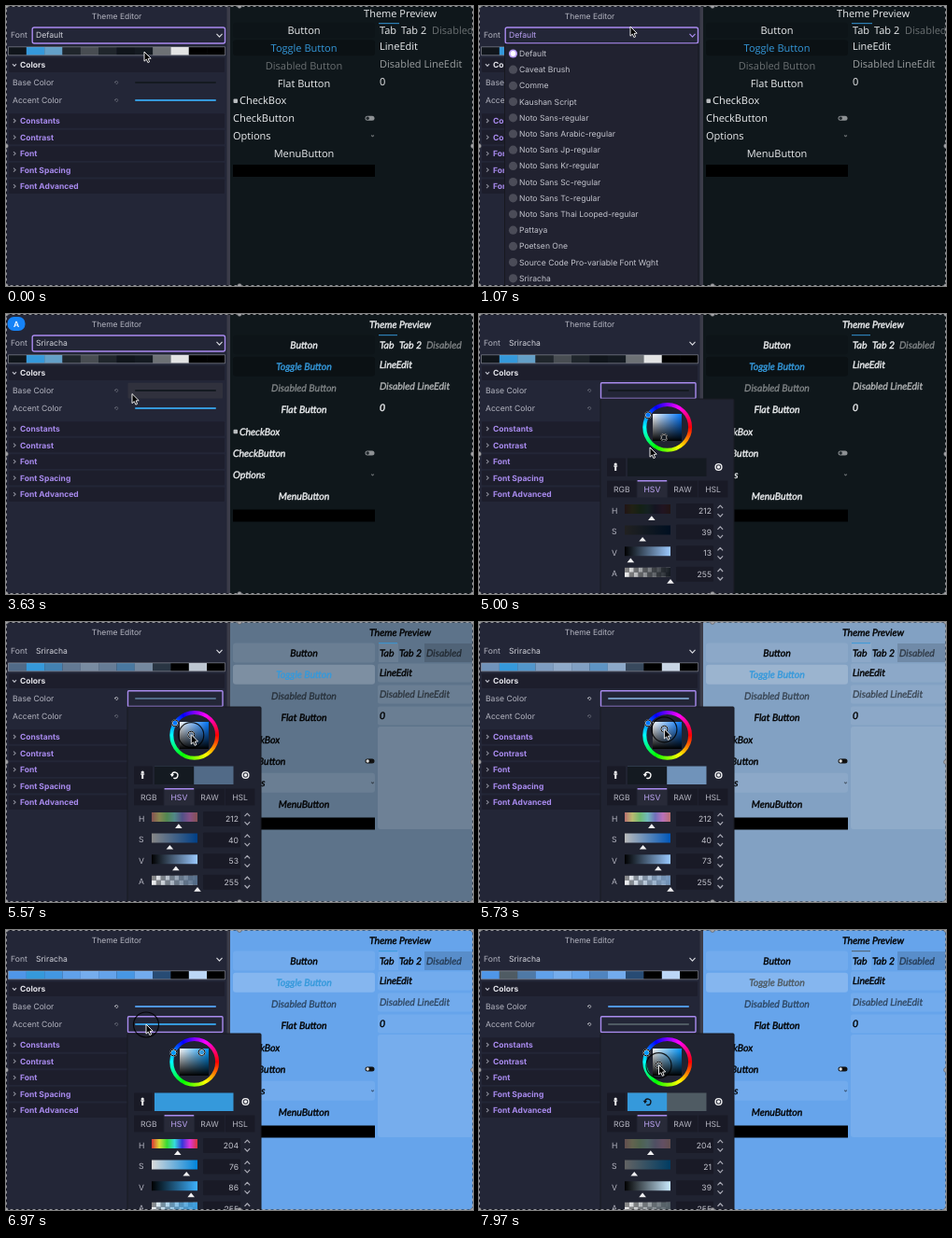
An HTML page with a canvas that plays this animation: 500 by 300 pixels, repeating every 8 s.

```html
<!DOCTYPE html>
<html lang="en">
<head>
<meta charset="utf-8">
<title>Theme Editor</title>
<style>
  html, body { margin: 0; width: 100%; height: 100%; overflow: hidden; background: #232637; }
  canvas { display: block; width: 500px; height: 300px; }
</style>
</head>
<body>
<canvas id="stage"></canvas>
<script>
const LOOP = 8000;
const PURPLE = '#a98bef', PANEL = '#232637', HEADER = '#1d1e2c', DARK = '#191a26', LABEL = '#b4b5c0';
const BLACK = [0, 0, 0], WHITE = [255, 255, 255], DEEP = [8, 20, 20];
const UI = 'Inter, sans-serif';
const FONTS = ['Default', 'Caveat Brush', 'Comme', 'Kaushan Script', 'Noto Sans-regular',
  'Noto Sans Arabic-regular', 'Noto Sans Jp-regular', 'Noto Sans Kr-regular', 'Noto Sans Sc-regular',
  'Noto Sans Tc-regular', 'Noto Sans Thai Looped-regular', 'Pattaya', 'Poetsen One',
  'Source Code Pro-variable Font Wght', 'Sriracha'];

// Pointer path: time, x, y
const POINTER = [[30, 148, 49], [290, 162, 22], [1230, 162, 22], [1900, 83, 286], [2030, 81, 288.5],
  [2930, 81, 288.5], [3630, 135, 85.5], [4070, 134, 86], [4500, 134, 86], [5000, 183, 143],
  [5130, 184, 142], [5340, 198, 131], [5730, 198.4, 114.8], [5930, 206.5, 109.6], [5980, 206.5, 109.6],
  [6330, 92, 111], [6450, 92, 111], [6740, 150, 101], [7000, 150, 101], [7560, 207, 132],
  [7630, 207, 132], [7950, 192.5, 144.7]];
const PRESSES = [[480, 830], [2080, 2530], [4300, 4480], [5360, 5950], [6390, 6500], [6810, 6980], [7630, 8000]];
const BASE = { h: 212, initial: [.39, .13], drag: [5360, 5950], top: 0 };
const ACCENT = { h: 204, initial: [.76, .86], drag: [7630, 8000], top: 20 };

const canvas = document.getElementById('stage');
const ratio = window.devicePixelRatio || 1;
canvas.width = 500 * ratio;
canvas.height = 300 * ratio;
const ctx = canvas.getContext('2d');
ctx.scale(ratio, ratio);
ctx.textRendering = 'geometricPrecision';
ctx.lineJoin = 'round';

const clamp = (v, a = 0, b = 1) => Math.min(b, Math.max(a, v));
const between = (t, [a, b]) => t >= a && t < b;
const rgb = (c, alpha = 1) => `rgba(${c.map(Math.round)},${alpha})`;
const mix = (a, b, k) => a.map((v, i) => v + (b[i] - v) * k);
const shade = (c, k) => mix(c, k < 0 ? BLACK : WHITE, Math.abs(k));
const hsv = (h, s, v) => [5, 3, 1].map(n => {
  const k = (n + h / 60) % 6;
  return 255 * v * (1 - s * clamp(Math.min(k, 4 - k)));
});

function pointerAt(t) {
  const next = POINTER.findIndex(p => p[0] > t);
  if (next === 0) return POINTER[0].slice(1);
  if (next < 0) return POINTER.at(-1).slice(1);
  const [t0, x0, y0] = POINTER[next - 1], [t1, x1, y1] = POINTER[next];
  const k = (t - t0) / (t1 - t0), e = k * k * (3 - 2 * k);
  return [x0 + (x1 - x0) * e, y0 + (y1 - y0) * e];
}

// The dragged pointer position inside the picker square gives saturation and value.
function colorAt(slot, t) {
  let [s, v] = slot.initial;
  const changed = t >= slot.drag[0];
  if (changed) {
    const [x, y] = pointerAt(Math.min(t, slot.drag[1]));
    s = clamp((x - 186) / 31);
    v = clamp((136 + slot.top - y) / 29);
  }
  return { h: slot.h, s, v, changed, rgb: hsv(slot.h, s, v), old: hsv(slot.h, ...slot.initial) };
}

function text(str, x, y, color, { size = 8.6, weight = '400', family = UI, align = 'left', bold = 0 } = {}) {
  ctx.font = `${weight} ${size}px ${family}`;
  ctx.textAlign = align;
  ctx.fillStyle = ctx.strokeStyle = color;
  ctx.fillText(str, x, y + size * .36);
  if (bold) {
    ctx.lineWidth = bold;
    ctx.strokeText(str, x, y + size * .36);
  }
}

function box(x, y, w, h, fill, radius = 0, stroke, width = 1.4) {
  ctx.beginPath();
  ctx.roundRect(x, y, w, h, radius);
  if (fill) { ctx.fillStyle = fill; ctx.fill(); }
  if (stroke) { ctx.strokeStyle = stroke; ctx.lineWidth = width; ctx.stroke(); }
}

function circle(x, y, r, fill, stroke, width = 1) {
  box(x - r, y - r, 2 * r, 2 * r, fill, r, stroke, width);
}

function shape(points, fill, stroke, width = 1) {
  ctx.beginPath();
  points.forEach(p => ctx.lineTo(...p));
  if (fill) { ctx.closePath(); ctx.fillStyle = fill; ctx.fill(); }
  if (stroke) { ctx.strokeStyle = stroke; ctx.lineWidth = width; ctx.stroke(); }
}

const chevronV = (x, y, w, h, color) => shape([[x - w, y - h], [x, y + h], [x + w, y - h]], null, color, 1.2);

function gradientBox(x, y, w, h, colors, vertical) {
  const g = ctx.createLinearGradient(x, y, vertical ? x : x + w, vertical ? y + h : y);
  colors.forEach((c, i) => g.addColorStop(i / (colors.length - 1), c));
  box(x, y, w, h, g);
}

function undoIcon(x, y, r, color) {
  ctx.beginPath();
  ctx.arc(x, y, r, -2.9, 2);
  ctx.strokeStyle = color;
  ctx.lineWidth = r * .42;
  ctx.stroke();
  shape([[x - r * 1.6, y - r * .5], [x - r * .9, y + r * .5], [x - r * .2, y - r * .3]], color);
}

function drawPreview(t, base, accent) {
  const script = t >= 2530, light = base.v > .5;
  const step = script ? 23.2 : 18.85, top = script ? 33 : 26, half = step * .45;
  const lift = clamp((base.v - .13) * 2);
  const bg = mix(mix(base.rgb, DEEP, .45 * (1 - lift)), WHITE, .13 * lift);
  const fg = light ? '#000' : '#eceef0';
  const dim = rgb(light ? BLACK : WHITE, light ? .48 : .38);
  const field = light ? 'rgba(255,255,255,.08)' : 'rgba(0,0,0,.12)';
  const style = script
    ? { size: 10.5, weight: 'italic 400', family: 'Lato, sans-serif', bold: .4 }
    : { size: 11, family: '"Open Sans", sans-serif' };
  const write = (s, x, y, color = fg, align = 'left') => text(s, x, y, color, { ...style, align });
  const row = i => top + step * i;
  const rowBox = (i, fill) => box(243, row(i) - half, 152, half * 2, fill, 3);

  box(240, 0, 260, 300, rgb(bg));
  rowBox(0, field);
  rowBox(1, light ? 'rgba(255,255,255,.2)' : 'rgba(0,0,0,.28)');
  if (light) rowBox(6, field);
  write('Button', 319, row(0), fg, 'center');
  write('Toggle Button', 319, row(1), rgb(accent.rgb), 'center');
  write('Disabled Button', 319, row(2), dim, 'center');
  write('Flat Button', 319, row(3), fg, 'center');
  box(243.5, row(4) - 2, 4.5, 4.5, light ? '#222' : '#b9bcbf', 1);
  write('CheckBox', 250, row(4));
  write('CheckButton', 243, row(5));
  box(384.5, row(5) - 2.5, 10, 5, light ? '#111' : '#8d9194', 2.5);
  circle(387.2, row(5), 1.7, light ? '#ddd' : '#20272c');
  write('Options', 243, row(6));
  chevronV(392.5, row(6), 1.4, .6, dim);
  write('MenuButton', 319, row(7), fg, 'center');
  box(243, row(7) + (script ? 14 : 12), 152, 13, '#000');

  write('Theme Preview', 422, script ? 11 : 8.5, fg, 'center');
  const fields = script ? [54, 77, 100] : [43, 62, 81];
  if (light) {
    box(399, 23, 21, 20, field);
    box(448, 23, 52, 20, 'rgba(0,0,0,.14)');
    fields.forEach(y => box(398, y - 9.5, 102, 20, field, 2));
    box(398, 112, 102, 110, 'rgba(255,255,255,.1)', 3);
  }
  box(399, script ? 22 : 18, script ? 20 : 22, 1.2, rgb(accent.rgb, .8));
  write('Tab', 400, top);
  write('Tab 2', script ? 421 : 423, top);
  write('Disabled', script ? 450 : 456, top, dim);
  write('LineEdit', 400, fields[0]);
  write('Disabled LineEdit', 400, fields[1], light ? dim : 'rgba(255,255,255,.58)');
  write('0', 400, fields[2]);
}

function drawPalette(base, accent) {
  const light = base.v > .5, b = base.rgb, a = accent.rgb;
  const colors = light
    ? [b, a, mix(a, b, .5), shade(b, .1), shade(b, .22), shade(b, .12), mix(b, a, .3),
       shade(b, .2), shade(b, -.5), BLACK, shade(b, .62), BLACK]
    : [shade(b, -.2), a, mix(a, [170, 170, 170], .4), shade(b, .05), shade(b, .22), shade(b, .05),
       shade(b, -.2), b, shade(b, .38), shade(b, .88), BLACK, BLACK];
  colors.forEach((c, i) => box(2.5 + i * 19.33, 44, 19.4, 8.5, rgb(c)));
  box(2.5, 43.8, 232, 9, null, 0, 'rgba(190,192,200,.55)', .8);
}

function drawEditor(t, base, accent, pointer) {
  const open = between(t, [830, 2530]);
  box(0, 0, 237, 300, PANEL);
  box(236.5, 0, 3.5, 300, '#3b3c49');
  text('Theme Editor', 118.5, 11, LABEL, { size: 8.5, align: 'center' });
  text('Font', 5, 31, LABEL);
  if (t < 4300) box(28.2, 23, 206.3, 17, PANEL, 2, PURPLE);
  text(t < 2530 ? 'Default' : 'Sriracha', 32, 31.3, open ? '#b9a0f3' : '#d0d1d9');
  chevronV(228.5, 31.5, 3, 1.6, open ? PURPLE : '#d5d6dd');
  drawPalette(base, accent);

  box(3, 55.5, 231, 15.5, HEADER, 1);
  chevronV(9, 63.3, 2, 1.1, LABEL);
  text('Colors', 15, 63.2, '#e2e2e8', { size: 8.5, weight: '700' });
  [['Base Color', 82, base], ['Accent Color', 101, accent]].forEach(([label, y, color], i) => {
    const focused = i ? t >= 6810 : between(t, [4300, 6810]);
    const hovered = pointer[0] > 130 && pointer[0] < 232 && Math.abs(pointer[1] - y) < 9;
    text(label, 7, y, LABEL);
    undoIcon(118.3, y, 1.5, color.changed ? '#e6e6ea' : '#777986');
    if (hovered || focused) box(130.5, y - 8.3, 101.5, 16.8, focused ? PANEL : '#30313d', 1, focused && PURPLE);
    box(138, y - 1, 87, 2, rgb(color.rgb), 1);
  });
  ['Constants', 'Contrast', 'Font', 'Font Spacing', 'Font Advanced'].forEach((label, i) => {
    const y = 123 + i * 17.55;
    box(3, y - 7.8, 231, 15.6, HEADER, 1);
    shape([[8, y - 2], [10.2, y], [8, y + 2]], null, '#8c8d99', 1.1);
    text(label, 15, y, PURPLE, { size: 8.5, weight: '700' });
  });
  if (open) drawFontList(pointer);
}

function drawFontList(pointer) {
  const hovered = Math.floor((pointer[1] - 46.5) / 17.2);
  box(27.5, 41, 207.5, 262, '#212230', 0, '#17181f', 1);
  FONTS.forEach((name, i) => {
    const y = 51 + 17.2 * i;
    if (i === hovered) box(28, y - 8.6, 206.5, 17.2, '#3a3b48');
    circle(36.5, y, 4.6, i ? '#4b4c58' : '#b79bf7');
    if (!i) circle(36.5, y, 2.9, '#fff');
    text(name, 43, y, '#c3c4cd');
  });
}

function drawPicker(top, color) {
  const { h, s, v } = color, steps = [0, 1, 2, 3, 4, 5, 6];
  ctx.save();
  ctx.translate(0, top);
  box(130, 91, 143, 240, '#202331', 1, '#181a23', 1);

  const wheel = ctx.createConicGradient(0, 201.7, 121.3);
  steps.forEach(i => wheel.addColorStop(i / 6, rgb(hsv(i * 60, 1, 1))));
  circle(201.7, 121.3, 24.4, null, wheel, 4);
  gradientBox(186, 107, 31, 29, ['#fff', rgb(hsv(h, 1, 1))]);
  gradientBox(186, 107, 31, 29, ['rgba(0,0,0,0)', '#000'], true);
  const angle = h * Math.PI / 180;
  const marks = [[201.7 + 24.4 * Math.cos(angle), 121.3 + 24.4 * Math.sin(angle), rgb(hsv(h, 1, 1))],
    [186 + 31 * s, 136 - 29 * v, rgb(color.rgb)]];
  marks.forEach(([x, y, fill]) => {
    circle(x, y, 3.2, fill, '#fff', 1.4);
    circle(x, y, 3.5, null, '#000', 1);
  });

  box(137, 154.5, 20, 19.5, DARK, 1);
  shape([[146.2, 168], [146.2, 163]], null, '#f0f0f2', 2);
  shape([[144.2, 163], [148.2, 163]], null, '#f0f0f2', 1.2);
  circle(146.2, 161, 1.6, '#f0f0f2');
  box(159, 154.5, 84.5, 19.5, rgb(color.rgb));
  if (color.changed) {
    box(159, 154.5, 42.2, 19.5, rgb(color.old));
    undoIcon(180.7, 164.3, 3.2, top ? '#10151b' : '#fff');
  }
  circle(256.5, 164, 3.4, null, '#f0f0f2', 1.4);
  circle(256.5, 164, 1.8, '#f0f0f2');

  ['RGB', 'HSV', 'RAW', 'HSL'].forEach((name, i) => {
    const x = 137 + i * 32.6, selected = i === 1;
    box(x, 178.5, 31.6, 18, selected ? '#282a38' : DARK);
    if (selected) box(x, 178, 31.6, 1.4, PURPLE);
    text(name, x + 15.8, 187.8, selected ? '#bfa7f6' : LABEL, { align: 'center' });
  });

  const rows = [
    ['H', h / 360, h, steps.map(i => rgb(hsv(i * 60, s, v)))],
    ['S', s, s * 100, [rgb(hsv(h, 0, v)), rgb(hsv(h, 1, v))]],
    ['V', v, v * 100, ['#000', rgb(hsv(h, s, 1))]],
    ['A', 1, 255, [rgb(color.rgb, 0), rgb(color.rgb)]]
  ];
  rows.forEach(([name, part, value, colors], i) => {
    const y = 210.5 + i * 22.6;
    text(name, 142, y, LABEL);
    if (name === 'A') {
      for (let n = 0; n < 20; n++) {
        const col = n % 10, line = n < 10 ? 0 : 1;
        box(156 + col * 4.9, y - 6.5 + line * 5, 4.9, 5, (col + line) % 2 ? '#f2f2f2' : '#8a8a8a');
      }
    }
    gradientBox(156, y - 6.5, 49, 10, colors);
    const x = 156 + 49 * part;
    shape([[x - 3.8, y + 10.5], [x, y + 5.8], [x + 3.8, y + 10.5]], '#f0f0f2');
    box(211, y - 7.5, 40, 16, DARK, 1);
    text(String(Math.round(value)), 249, y + .5, '#c3c4cd', { align: 'right' });
    chevronV(258.3, y - 3.8, 2.8, -1.5, '#a9aab5');
    chevronV(258.3, y + 5.2, 2.8, 1.5, '#a9aab5');
  });
  ctx.restore();
}

function drawPointer(t, [x, y]) {
  const press = PRESSES.find(p => between(t, p));
  if (press) circle(x, y + .5, 8 + 5.5 * clamp((t - press[0]) / 90), null, 'rgba(0,0,0,.85)', 1.2);
  const arrow = [[0, 0], [0, 10.2], [2.3, 8.1], [3.9, 11.6], [5.6, 10.8], [4.1, 7.4], [7.2, 7.2], [0, 0]]
    .map(([dx, dy]) => [x + dx, y + dy]);
  shape(arrow, '#000', '#fff', .9);
}

function drawSelection() {
  box(.5, .5, 499, 299, null, 0, 'rgba(0,0,0,.4)', 1);
  ctx.setLineDash([3, 3]);
  box(.5, .5, 499, 299, null, 0, 'rgba(190,190,195,.75)', 1);
  ctx.setLineDash([]);
  for (const x of [0, 250, 500]) {
    for (const y of [0, 150, 300]) {
      if (x !== 250 || y !== 150) circle(x, y, 2.4, '#a8a8ac', '#55565c', .6);
    }
  }
}

function draw() {
  const t = performance.now() % LOOP;
  const pointer = pointerAt(t), base = colorAt(BASE, t), accent = colorAt(ACCENT, t);
  drawPreview(t, base, accent);
  drawEditor(t, base, accent, pointer);
  if (between(t, [4420, 6450])) drawPicker(BASE.top, base);
  if (t >= 6900) drawPicker(ACCENT.top, accent);
  drawSelection();
  if (between(t, [1260, 4700])) {
    box(1.5, 3, 19, 15, '#1683f7', 7);
    text('A', 11, 10.5, '#fff', { size: 8.5, weight: '600', align: 'center' });
  }
  drawPointer(t, pointer);
  requestAnimationFrame(draw);
}
draw();
</script>
</body>
</html>
```
